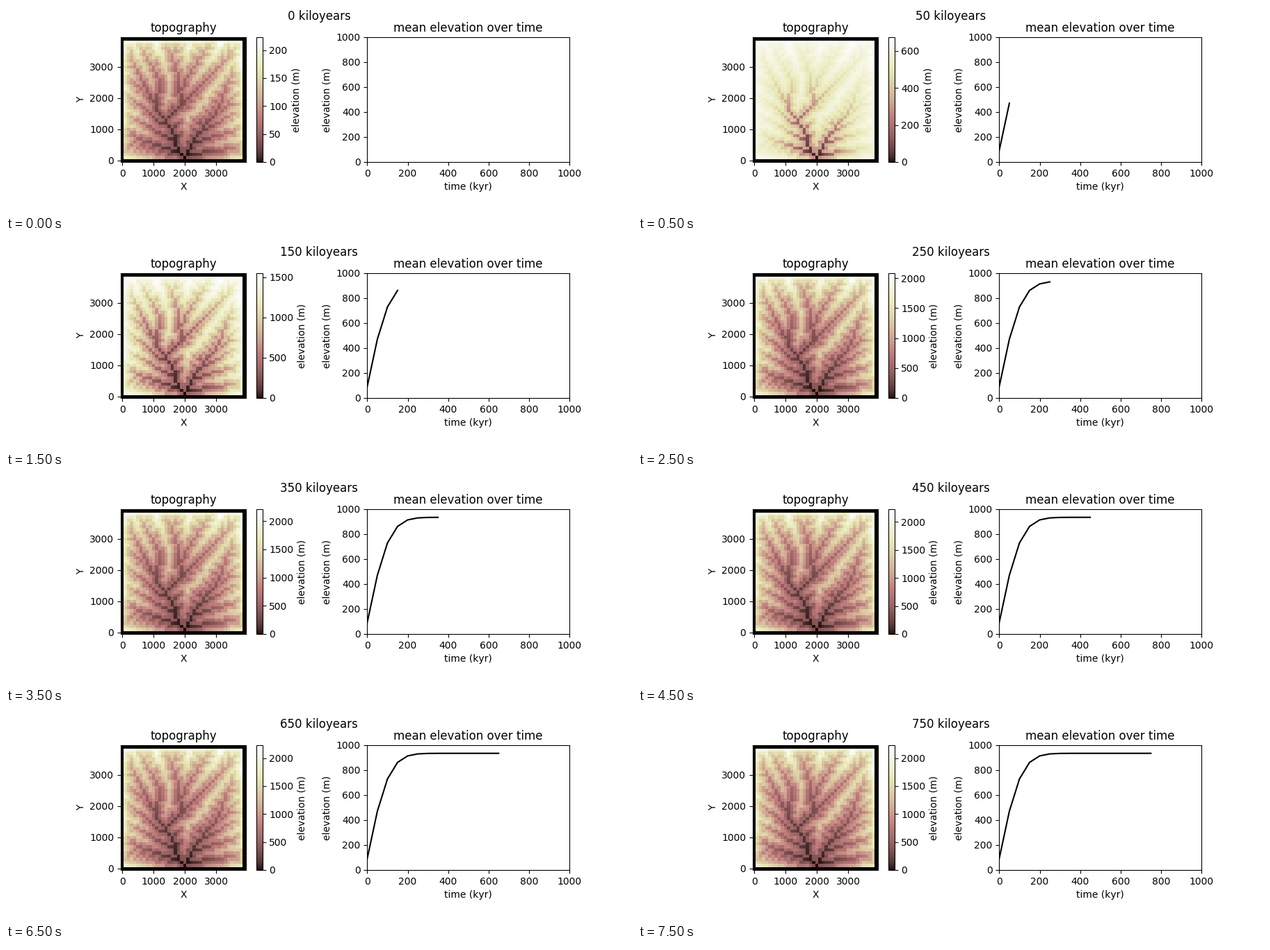
These frames come from a looping animation (900x300 px, 8000 ms). A matplotlib script:

```python
import random

import numpy as np
import matplotlib.pyplot as plt
from matplotlib.animation import FuncAnimation

N, FRAMES, STEP = 40, 16, 50          # grid size, frame count, kyr per frame
DT, UPLIFT = 5, 10                    # kyr, m per kyr
OUTLET = 20
RELIEF = 223                          # highest point at the start, m

# Main stems as (column, row), each running upstream
STEMS = [
    [(20, 0), (17, 5), (17, 8), (10, 18), (3, 33)],
    [(11, 18), (12, 26), (6, 36)],
    [(14, 13), (19, 18), (18, 26), (16, 34)],
    [(18, 21), (21, 27), (27, 36)],
    [(19, 18), (32, 31)],
    [(20, 0), (23, 7), (30, 15), (35, 28)],
]
# Side valleys fan out from the two lower stems
LEFT = [[(19 - 2 * k, 2 + 4 * k), (3, 8 + 6 * k)] for k in range(4)]
RIGHT = [[(21 + 3 * k, 2 + 4 * k), (37, 4 + 6 * k)] for k in range(4)]

rng = random.Random(4)
plt.rcParams["text.kerning_factor"] = 6


def is_open(r, c):
    return (0 < r < N - 1 and 0 < c < N - 1) or r * N + c == OUTLET


def neighbours(i):
    r, c = divmod(i, N)
    return [((r + dr) * N + c + dc, np.hypot(dr, dc))
            for dr in (-1, 0, 1) for dc in (-1, 0, 1)
            if (dr or dc) and is_open(r + dr, c + dc)]


nodes = [r * N + c for r in range(N) for c in range(N) if is_open(r, c)]
near = {i: neighbours(i) for i in nodes}


def valley_cells():
    cells = set()
    for path in STEMS + LEFT + RIGHT:
        for (c0, r0), (c1, r1) in zip(path, path[1:]):
            n = max(abs(c1 - c0), abs(r1 - r0))
            for k in range(n + 1):
                cells.add(round(r0 + (r1 - r0) * k / n) * N
                          + round(c0 + (c1 - c0) * k / n))
    return cells


def first_routing():
    """Cheapest way from every node to the outlet, favouring valleys."""
    valley = valley_cells()
    cost = {i: 0.3 if i in valley else rng.uniform(1, 1.4) for i in nodes}
    done, front, down = {}, {OUTLET: 0}, {}
    while front:
        i = min(front, key=front.get)
        done[i] = front.pop(i)
        for j, length in near[i]:
            d = done[i] + length * cost[j]
            if j not in done and d < front.get(j, np.inf):
                front[j], down[j] = d, (i, length)
    return list(done), down


def response(order, down):
    """Travel time through each node and from each node to the outlet."""
    area = dict.fromkeys(order, 1)
    for i in reversed(order[1:]):
        area[down[i][0]] += area[i]
    lag, total = {}, {OUTLET: 0}
    for i in order[1:]:
        j, length = down[i]
        lag[i] = length / area[i] ** 0.5
        total[i] = total[j] + lag[i]
    return lag, total


def steepest(total):
    order = sorted(nodes, key=total.get)
    down = {i: max(near[i], key=lambda n: (total[i] - total[n[0]]) / n[1])
            for i in order[1:]}
    return order, down


def landscapes():
    """Stream-power erosion after the uplift rate jumps from 1 to UPLIFT."""
    order, down = first_routing()
    lag, total = response(order, down)
    for _ in range(14):
        order, down = steepest(total)
        lag, total = response(order, down)

    scale = RELIEF / max(total.values())
    z = {i: total[i] * scale for i in order}
    rate = {i: DT / (lag[i] * scale) for i in order[1:]}
    maps = []
    for _ in range(FRAMES):
        grid = np.full(N * N, np.nan)
        grid[order] = [z[i] for i in order]
        maps.append(np.ma.masked_invalid(grid.reshape(N, N)))
        for _ in range(STEP // DT):
            for i in order[1:]:
                f = rate[i]
                z[i] = (z[i] + UPLIFT * DT + f * z[down[i][0]]) / (1 + f)
    return maps


maps = landscapes()
times = STEP * np.arange(FRAMES)
means = 935 - 842 * np.exp(-times / 103 - (times / 150.4) ** 2)

fig, (ax, graph) = plt.subplots(1, 2, figsize=(9, 3), dpi=100)
fig.subplots_adjust(left=0.125, right=0.9, bottom=0.25, top=0.85, wspace=0.4)
heading = fig.suptitle("0 kiloyears")

cmap = plt.get_cmap("pink").copy()
cmap.set_bad("black")
image = ax.imshow(maps[0], cmap=cmap, origin="lower", interpolation="nearest",
                  extent=(-50, 3950, -50, 3950), vmin=0, vmax=maps[0].max())
ax.set(title="topography", xlabel="X", ylabel="Y",
       xticks=range(0, 4000, 1000), yticks=range(0, 4000, 1000))
fig.colorbar(image, ax=ax, label="elevation (m)")

line, = graph.plot([], [], color="black", lw=1.5)
graph.set(title="mean elevation over time", xlabel="time (kyr)",
          ylabel="elevation (m)", xlim=(0, 1000), ylim=(0, 1000))


def update(k):
    heading.set_text(f"{times[k]} kiloyears")
    image.set_data(maps[k])
    image.set_clim(0, maps[k].max())
    line.set_data(times[:k + 1], means[:k + 1])
    return heading, image, line


anim = FuncAnimation(fig, update, frames=FRAMES, interval=500,
                     repeat=True, repeat_delay=0, blit=False)
plt.show()
```
